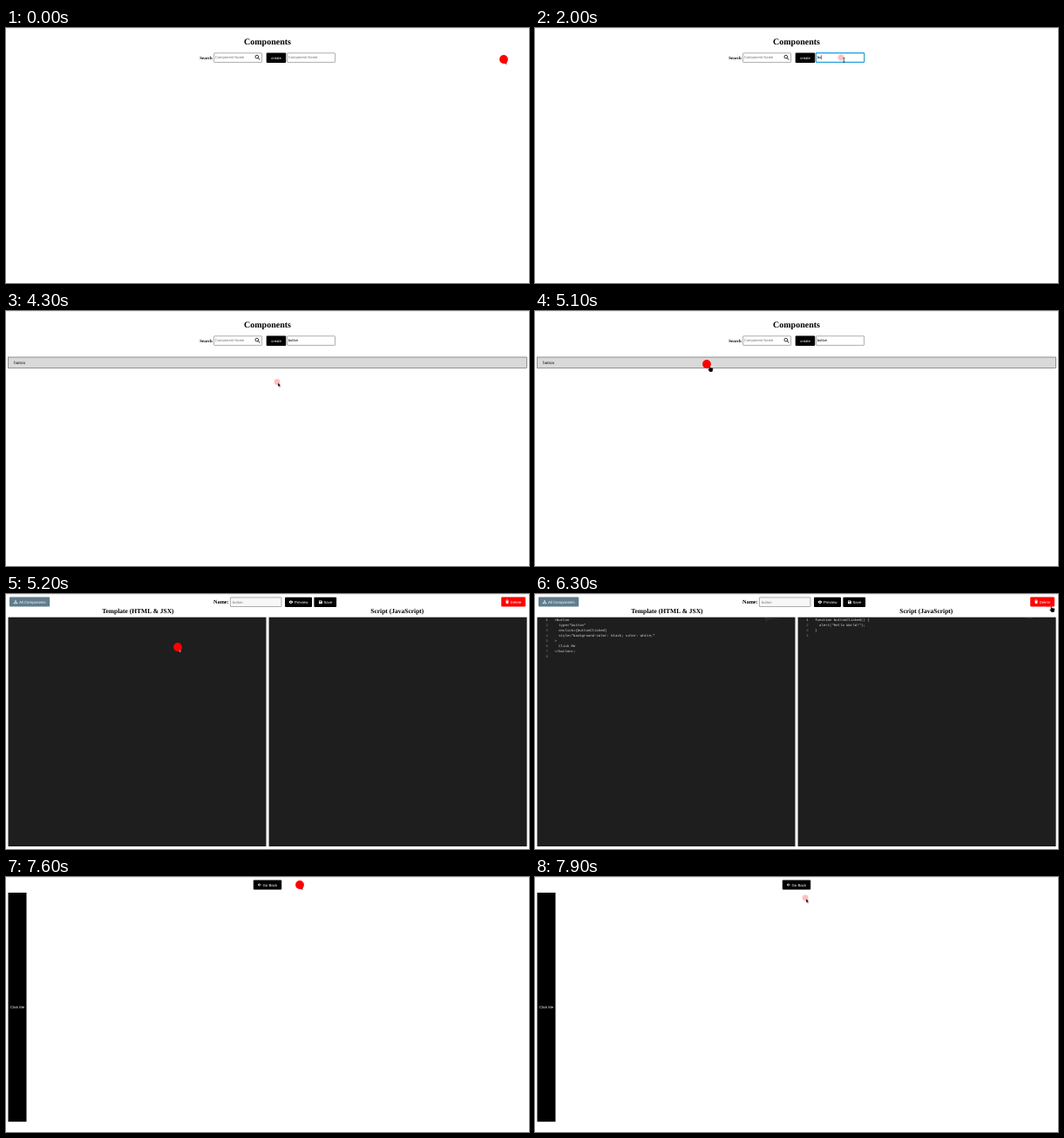
Recreate the animation shown at these times as an HTML page. Size 600 by 293 pixels, loop 8000 ms.

```html
<!DOCTYPE html>
<html lang="en">
<head>
<meta charset="utf-8">
<title>Component editor</title>
<style>
  html, body { margin: 0; width: 100%; height: 100%; overflow: hidden; background: #fff; }
  svg { display: block; width: 100vw; height: 100vh; }
  text { text-rendering: geometricPrecision; white-space: pre; font-family: "Liberation Sans", Arial, sans-serif; font-size: 4.17px; }
  .serif { font-family: "Liberation Serif", Times, serif; }
  .bold { font-weight: 700; }
  .mid { text-anchor: middle; }
  .end { text-anchor: end; }
  .btn { font-size: 4.375px; fill: #fff; }
  .code { font-family: "Liberation Mono", monospace; font-size: 4.01px; fill: #dcdcdc; }
  .num { fill: #858585; }
  .mini { font-family: "Liberation Mono", monospace; font-size: .6px; fill: #d4d4d4; opacity: .7; }
  .hint { fill: #757575; }
  .field { fill: #fff; stroke: #767676; stroke-width: .6; }
</style>
</head>
<body>
<svg viewBox="0 0 600 293" preserveAspectRatio="none">
  <rect width="600" height="293" fill="#fff"/>
  <rect width="600" height="1" fill="#eee"/>

  <g id="list">
    <text class="serif bold mid" x="300" y="19.2" style="font-size:10px">Components</text>
    <text class="serif bold" x="222.3" y="35.6" style="font-size:4.9px">Search</text>
    <rect class="field" x="238.6" y="28.8" width="55" height="10.6" rx=".6"/>
    <text class="hint" x="239.7" y="35.3">Component Name</text>
    <g fill="none" stroke="#000" stroke-width=".8">
      <circle cx="287.8" cy="33.1" r="1.8"/>
      <path d="M289.2 34.5l2.1 2.1" stroke-width="1"/>
    </g>
    <rect x="298.7" y="28.6" width="22.5" height="11.4" rx="1"/>
    <text class="mid" x="310" y="35.6" fill="#fff">create</text>
    <rect class="field" x="322.6" y="28.8" width="55" height="10.6" rx=".6"/>
    <rect id="ring" x="322.2" y="28.6" width="55.6" height="10.8" rx=".8" fill="none" stroke="#2ba3e0" stroke-width="1.1"/>
    <text id="entry" x="323.7" y="35.3"></text>
    <rect id="caret" y="31.2" width=".5" height="5"/>
    <g id="row">
      <rect x="2.6" y="53" width="594.9" height="12.5" fill="#d9d9d9" stroke="#555" stroke-width=".6"/>
      <text class="serif" x="9.2" y="60.6" style="font-size:5px">button</text>
    </g>
  </g>

  <g id="editor">
    <rect x="4" y="3.4" width="46.2" height="11.2" rx="1" fill="#607d8b"/>
    <path d="M11 6.9v1.5M9.4 10.5l1.6-2.1 1.6 2.1M8.7 10.7h1.5M10.3 10.7h1.4M11.8 10.7h1.5" fill="none" stroke="#fff" stroke-width=".8"/>
    <text class="btn" x="14.9" y="10.6">All Components</text>
    <text class="serif bold" x="238" y="10.8" style="font-size:6.25px">Name:</text>
    <rect x="257.4" y="3.9" width="58.6" height="10.6" rx=".6" fill="#f7f7f7" stroke="#767676" stroke-width=".6"/>
    <text class="hint" x="260" y="10.6">button</text>
    <rect x="320" y="3.8" width="31" height="11.2" rx="1"/>
    <path d="M324.5 9.3q2.4-3.4 4.8 0q-2.4 3.4-4.8 0z" fill="#fff"/>
    <circle cx="326.9" cy="9.2" r=".8"/>
    <text class="btn" x="331" y="10.9">Preview</text>
    <rect x="353.4" y="3.8" width="25.7" height="11.2" rx="1"/>
    <path d="M359 7.4h3l.8.8v3h-3.8z" fill="#fff"/>
    <path d="M359.6 7.9h2v.9h-2z"/>
    <circle cx="360.9" cy="10" r=".55"/>
    <text class="btn" x="364.4" y="10.9">Save</text>
    <rect x="568.2" y="3.4" width="27.8" height="11.2" rx="1" fill="#f00"/>
    <path d="M573.2 7h3.6v.6h-3.6zM574.3 6.5h1.4v.6h-1.4zM573.5 8h3l-.2 3.1h-2.6z" fill="#fff"/>
    <text class="btn" x="578.8" y="10.6">Delete</text>
    <text class="serif bold mid" x="151.4" y="21.6" style="font-size:7.5px">Template (HTML &amp; JSX)</text>
    <text class="serif bold mid" x="448.8" y="21.6" style="font-size:7.5px">Script (JavaScript)</text>
    <rect x="2.5" y="26.7" width="296" height="263.3" fill="#1e1e1e"/>
    <rect x="301.6" y="26.7" width="296" height="263.3" fill="#1e1e1e"/>
    <g id="code"></g>
  </g>

  <g id="preview">
    <rect x="283.8" y="3.4" width="32.4" height="11.2" rx="1"/>
    <path d="M292.6 9H289.4M290.9 7.4L289.3 9l1.6 1.6" fill="none" stroke="#fff" stroke-width=".8"/>
    <text class="btn" x="294.4" y="10.6">Go Back</text>
    <rect x="2.5" y="18" width="21" height="263.2"/>
    <text class="mid" x="13" y="151" fill="#fff">Click Me</text>
  </g>

  <g id="pointer">
    <path id="arrow" d="M1 1v4.6l1.1-1 .8 1.7.8-.4-.8-1.6h1.5z" stroke-width=".3"/>
    <path id="beam" d="M2.4.4h2M3.4.4v4.8M2.4 5.2h2" fill="none" stroke-width=".6"/>
    <path id="hand" d="M2.6 1.2q.8-.5 1.2.3v2.3l2.9.8q.7.2.6 1l-.4 2.1-.6 1.3H3.5L1.2 6q0-1 1.4-.3z" stroke="#fff" stroke-width=".3"/>
    <circle id="dot" fill="#f00"/>
  </g>
</svg>
<script>
const LOOP = 8000, STEP = 100;
const el = id => document.getElementById(id);
const show = (id, on) => el(id).style.display = on ? '' : 'none';

// time, x, y, pointer shape
const path = [
  [0, 571, 36, 'arrow'], [300, 530, 66, 'arrow'], [500, 440, 87, 'arrow'],
  [700, 350, 66, 'arrow'], [900, 325, 40, 'beam'], [1000, 351, 34, 'beam'],
  [3200, 351, 34, 'beam'], [3400, 316, 36, 'hand'], [3500, 313, 36, 'hand'],
  [3900, 313, 36, 'hand'], [4200, 300, 76, 'arrow'], [4400, 322, 87, 'arrow'],
  [4700, 310, 22, 'arrow'], [4899, 310, 22, 'arrow'], [4900, 197, 61, 'hand'],
  [5200, 197, 61, 'arrow'], [5900, 197, 60, 'arrow'], [6300, 589, 12, 'hand'],
  [6400, 589, 11, 'hand'], [6800, 21, 12, 'hand'], [7100, 338, 17, 'hand'],
  [7300, 337, 9, 'hand'], [7600, 337, 9, 'arrow'], [7899, 337, 9, 'arrow'],
  [7900, 310, 24, 'arrow'], [8000, 310, 24, 'arrow']
];

// press, release, fully faded
const clicks = [
  [-100, 0, 400], [1000, 1200, 1800], [3600, 3700, 4200],
  [4900, 5200, 5600], [7400, 7800, 7900]
];

const word = 'button';
const keys = [1900, 2000, 2300, 2400, 2500, 2600];

const template = [
  '<button', '  type="button"', '  onclick={buttonClicked}',
  '  style="background-color: black; color: white;"', '>', '  Click Me', '</button>;', ''
];
const script = ['function buttonClicked() {', '  alert("Hello World!");', '}', ''];

function addText(cls, x, y, str) {
  const node = document.createElementNS('http://www.w3.org/2000/svg', 'text');
  node.setAttribute('class', cls);
  node.setAttribute('x', x);
  node.setAttribute('y', y);
  node.textContent = str;
  el('code').append(node);
  return node;
}

function addCode(lines, left, miniX) {
  lines.forEach((line, i) => {
    const y = 31.1 + i * 5.94;
    const num = addText('code num end', left + 12.2, y, i + 1);
    if (!i) num.style.fill = '#d0d0d0';
    addText('code', left + 19.8, y, line);
    addText('mini', miniX, 27.6 + i * .62, line);
  });
}

function pointerAt(t) {
  const i = path.findIndex(p => p[0] > t);
  const [t0, x0, y0, shape] = path[i - 1], [t1, x1, y1] = path[i];
  const k = (t - t0) / (t1 - t0);
  return { x: x0 + (x1 - x0) * k, y: y0 + (y1 - y0) * k, shape };
}

function pressAt(t) {
  const click = clicks.find(c => t >= c[0] && t < c[2]);
  if (!click) return 0;
  return t <= click[1] ? 1 : (click[2] - t) / (click[2] - click[1]);
}

function drawField(t) {
  const typed = keys.filter(k => k <= t).length;
  const focused = t >= 1000 && t < 3600;
  const lastKey = typed ? keys[typed - 1] : 1000;
  const entry = el('entry');
  entry.textContent = typed ? word.slice(0, typed) : 'Component Name';
  entry.setAttribute('class', typed ? '' : 'hint');
  show('ring', focused);
  show('caret', focused && t < 3300 && (t - lastKey) % 1000 < 500);
  const width = typed ? entry.getComputedTextLength() : 0;
  el('caret').setAttribute('x', 323.7 + width);
}

function drawPointer(t) {
  const { x, y, shape } = pointerAt(t), press = pressAt(t);
  const dark = t >= 5200 && t < 7600 && y > 24;
  el('pointer').setAttribute('transform', `translate(${x} ${y})`);
  for (const id of ['arrow', 'beam', 'hand']) show(id, id === shape);
  el('arrow').setAttribute('fill', dark ? '#fff' : '#000');
  el('arrow').setAttribute('stroke', dark ? '#000' : '#fff');
  el('beam').setAttribute('stroke', '#000');
  el('dot').setAttribute('r', 3.4 + 1.5 * press);
  el('dot').setAttribute('opacity', .25 + .75 * press);
}

function draw(now) {
  const t = Math.floor(now % LOOP / STEP) * STEP;
  show('list', t < 5200);
  show('editor', t >= 5200 && t < 7600);
  show('preview', t >= 7600);
  show('row', t >= 4000);
  show('code', t >= 5500);
  if (t < 5200) drawField(t);
  drawPointer(t);
}

addCode(template, 2.6, 263.5);
addCode(script, 301.4, 562.5);

let start;
function tick(now) {
  start ??= now;
  draw(now - start);
  requestAnimationFrame(tick);
}
draw(0);
requestAnimationFrame(tick);
</script>
</body>
</html>
```
